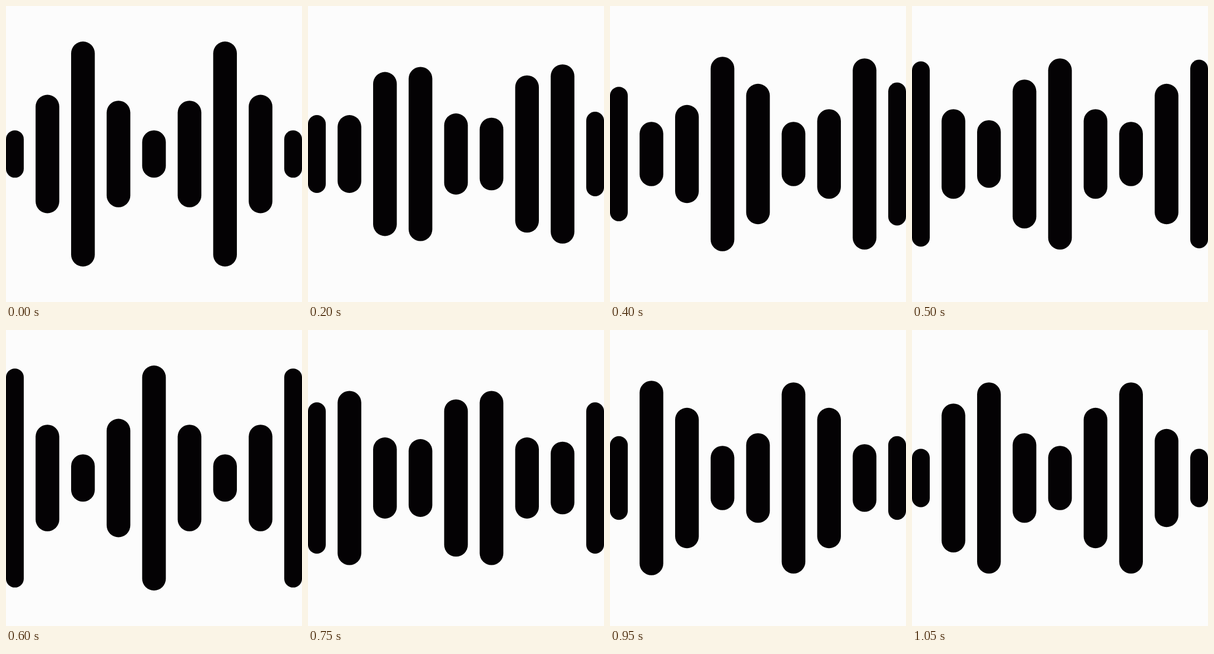
An HTML page that plays this animation: 532x532 px, repeating every 1100 ms.

```html
<!DOCTYPE html>
<html lang="en">
<head>
<meta charset="utf-8">
<title>Sound wave</title>
<style>
  html, body { margin: 0; width: 100%; height: 100%; overflow: hidden; background: #fcfcfc; }
  svg { display: block; width: 100%; height: 100%; filter: blur(0.7px); }
</style>
</head>
<body>
<svg id="stage" viewBox="0 0 50 50" fill="#040204"></svg>
<script>
  const SIZE = 50, GAP = 6, LAST = 8;
  const LOOP = 1100, STEP = 50;
  const POSES = 4, TICKS_PER_POSE = 7;
  const WAVE = [19, 9, 4, 9]; // half heights, from one crest to the next

  const stage = document.getElementById('stage');
  const bars = Array.from({ length: LAST + 1 }, (_, i) => {
    const bar = document.createElementNS('http://www.w3.org/2000/svg', 'rect');
    const left = Math.max(0, i * GAP - 1);
    const width = Math.min(SIZE, i * GAP + 3) - left;
    bar.setAttribute('x', left);
    bar.setAttribute('width', width);
    bar.setAttribute('rx', width / 2);
    stage.append(bar);
    return bar;
  });

  // The wave moves one bar to the right with each pose.
  function halfHeight(i, pose) {
    const shift = pose % POSES;
    const place = i - shift;
    const shoulder = place % GAP === 1 && shift < 3 ? 1 : 0;
    const cut = i % LAST === 0 && pose > 0 ? 0.5 : 0; // narrow outer bars end sooner
    return WAVE[(place + 2 + POSES) % POSES] + shoulder - cut;
  }

  // Motion has 25 ticks a second, shown 20 times a second: every fifth tick is skipped.
  const tickAt = step => Math.max(0, Math.ceil(step * 1.25 - 1));

  function draw(time) {
    const progress = tickAt(Math.floor(time % LOOP / STEP)) / TICKS_PER_POSE;
    const pose = Math.floor(progress);
    bars.forEach((bar, i) => {
      const from = halfHeight(i, pose);
      const half = from + (halfHeight(i, pose + 1) - from) * (progress - pose);
      bar.setAttribute('y', SIZE / 2 - half);
      bar.setAttribute('height', 2 * half);
    });
  }

  const start = performance.now();
  function loop() {
    draw(performance.now() - start);
    requestAnimationFrame(loop);
  }
  loop();
</script>
</body>
</html>
```
